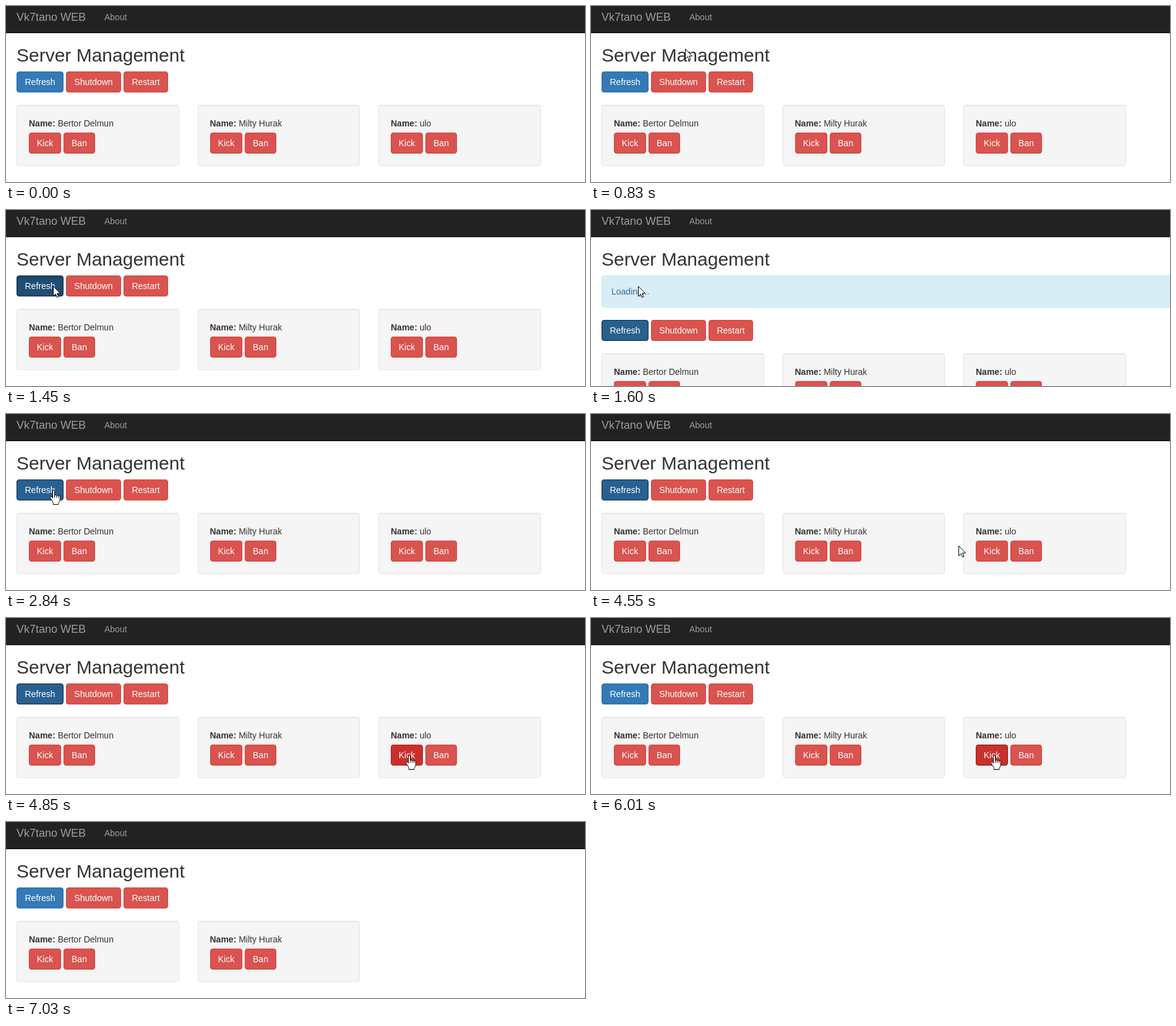
Write an HTML page that moves like this. It is 936 px wide and 285 px high and loops after 8520 ms.

```html
<!DOCTYPE html>
<html lang="en">
<head>
<meta charset="utf-8">
<title>Server Management</title>
<style>
html, body { margin: 0; width: 100%; height: 100%; overflow: hidden; background: #fff; }
body { position: relative; font: 14px/20px "Liberation Sans", Arial, sans-serif; color: #333; }
div, h1, svg { position: absolute; box-sizing: border-box; margin: 0; white-space: nowrap; }
#nav { left: 0; top: 0; width: 100%; height: 44px; background: #222; border-bottom: 1px solid #080808; color: #9d9d9d; }
#brand { left: 17px; top: 8px; font-size: 18px; }
#about { left: 159px; top: 8px; }
h1 { left: 17px; top: 63px; font-size: 30px; line-height: 33px; font-weight: normal; }
#alert {
  left: 17px; top: 106px; width: 940px; height: 52px; padding: 15px;
  background: #d9edf7; border: 1px solid #bce8f1; border-radius: 4px; color: #31708f;
}
#content { left: 0; top: 0; width: 100%; height: 285px; }
.card {
  top: 160px; width: 262.5px; height: 99px; padding: 19px;
  background: #f5f5f5; border: 1px solid #e3e3e3; border-radius: 4px;
  box-shadow: inset 0 1px 1px rgba(0,0,0,.05);
}
.btn {
  height: 34px; padding: 6px 0; text-align: center; color: #fff;
  background: #d9534f; border: 1px solid #d43f3a; border-radius: 4px;
}
.btn.hover { background: #c9302c; border-color: #ac2925; }
.btn.focus { background: #c9302c; border-color: #761c19; }
.btn.press { background: #ac2925; border-color: #761c19; }
.primary { background: #337ab7; border-color: #2e6da4; }
.primary.hover { background: #286090; border-color: #204d74; }
.primary.focus { background: #286090; border-color: #122b40; }
.primary.press { background: #204d74; border-color: #122b40; }
.btn.press { box-shadow: inset 0 3px 5px rgba(0,0,0,.125); }
#cursor { left: 0; top: 0; width: 20px; height: 26px; overflow: visible; }
#cursor path { fill: #fff; stroke: #000; stroke-width: 1; stroke-linejoin: round; }
</style>
</head>
<body>
<div id="nav"><div id="brand">Vk7tano WEB</div><div id="about">About</div></div>
<h1>Server Management</h1>
<div id="alert">Loading...</div>
<div id="content"></div>
<svg id="cursor">
  <path id="arrow" d="M.5 .5V16.5L4.2 13L6.6 18.6L9 17.6L6.6 12.1H11.6Z"/>
  <g id="hand" transform="translate(-5 0)">
    <path d="M6 .5C5 .5 4.5 1.2 4.5 2V13.2L3.2 11.6C2.5 10.7 1.3 10.7 .8 11.4S.5 12.8 1 13.6L4.6 19.2C5.1 20 5.3 20.6 5.3 21.4V23.5H13.8V21.8C13.8 20.3 16.3 18.6 16.3 15.4V10.8C16.3 9 14 8.8 13.6 10.2C13.6 8.2 11 8.2 10.6 9.6C10.6 7.7 8 7.6 7.6 9V2C7.6 1.2 7 .5 6 .5Z"/>
    <path d="M7.6 9V12.5M10.6 9.6V12.5M13.6 10.2V12.5"/>
  </g>
</svg>
<script>
const LOOP = 8520;
const ALERT_SHIFT = 72;
const $ = id => document.getElementById(id);
const content = $('content'), cursor = $('cursor');
const buttons = [];

function add(parent, className, left, html = '') {
  const el = document.createElement('div');
  el.className = className;
  el.style.left = left + 'px';
  el.innerHTML = html;
  return parent.appendChild(el);
}

function addButton(label, x, y, w, kind = '') {
  const base = 'btn ' + kind;
  const el = add(content, base, x, label);
  el.style.top = y + 'px';
  el.style.width = w + 'px';
  const button = { el, base, x, y, w };
  buttons.push(button);
  return button;
}

function addPlayer(name, x) {
  const card = add(content, 'card', x, `<b>Name:</b> ${name}`);
  const left = Math.round(x + 20);
  const kick = addButton('Kick', left, 205, 52);
  const ban = addButton('Ban', left + 56, 205, 51);
  return { kick, parts: [card, kick.el, ban.el] };
}

const refresh = addButton('Refresh', 17, 106, 76, 'primary');
addButton('Shutdown', 97, 106, 89);
addButton('Restart', 190, 106, 72);
addPlayer('Bertor Delmun', 17);
addPlayer('Milty Hurak', 309.5);
const lastPlayer = addPlayer('ulo', 602);

// Each row holds from its time until the next one.
const states = [
  { at: 0, cursor: false },
  { at: 220 },
  { at: 1070, refresh: 'hover' },
  { at: 1450, refresh: 'press' },
  { at: 1600, refresh: 'focus', loading: true },
  { at: 2840, refresh: 'focus' },
  { at: 4850, refresh: 'focus', kick: 'hover' },
  { at: 5710, kick: 'press' },
  { at: 6010, kick: 'focus' },
  { at: 7030, cursor: false, kicked: true }
];

// Stepped pointer moves along cubic curves.
const moves = [
  { from: 220, to: 1070, steps: 12, path: [[730, 246], [560, 110], [250, -58], [76, 123]] },
  { from: 4080, to: 4850, steps: 11, path: [[243, 129], [380, 130], [540, 215], [651, 222]] }
];

function pointerAt(t) {
  const { from, to, steps, path } = moves.filter(m => t >= m.from).pop() || moves[0];
  const last = steps - 1;
  const step = Math.floor((t - from) / (to - from) * last + 1e-6);
  const p = Math.min(Math.max(step, 0), last) / last;
  const u = 1 - (1 - p) ** 2, v = 1 - u;
  return [0, 1].map(k => Math.round(
    v ** 3 * path[0][k] + 3 * v * v * u * path[1][k] + 3 * v * u * u * path[2][k] + u ** 3 * path[3][k]));
}

const show = (el, on) => { el.style.display = on ? '' : 'none'; };
const setState = (button, state = '') => { button.el.className = `${button.base} ${state}`; };

function render(t) {
  const s = states.filter(row => t >= row.at).pop();
  const shift = s.loading ? ALERT_SHIFT : 0;
  show($('alert'), s.loading);
  content.style.top = shift + 'px';
  setState(refresh, s.refresh);
  setState(lastPlayer.kick, s.kick);
  lastPlayer.parts.forEach(el => show(el, !s.kicked));

  const [x, y] = pointerAt(t);
  const pressing = s.refresh === 'press' || s.kick === 'press';
  const overButton = buttons.some(b =>
    x >= b.x && x < b.x + b.w && y >= b.y + shift && y < b.y + shift + 34);
  const pointing = overButton && !pressing;
  show(cursor, s.cursor !== false);
  show($('hand'), pointing);
  show($('arrow'), !pointing);
  cursor.style.transform = `translate(${x}px, ${y}px)`;
}

const start = performance.now();
function tick() {
  render((performance.now() - start) % LOOP);
  requestAnimationFrame(tick);
}
tick();
</script>
</body>
</html>
```
